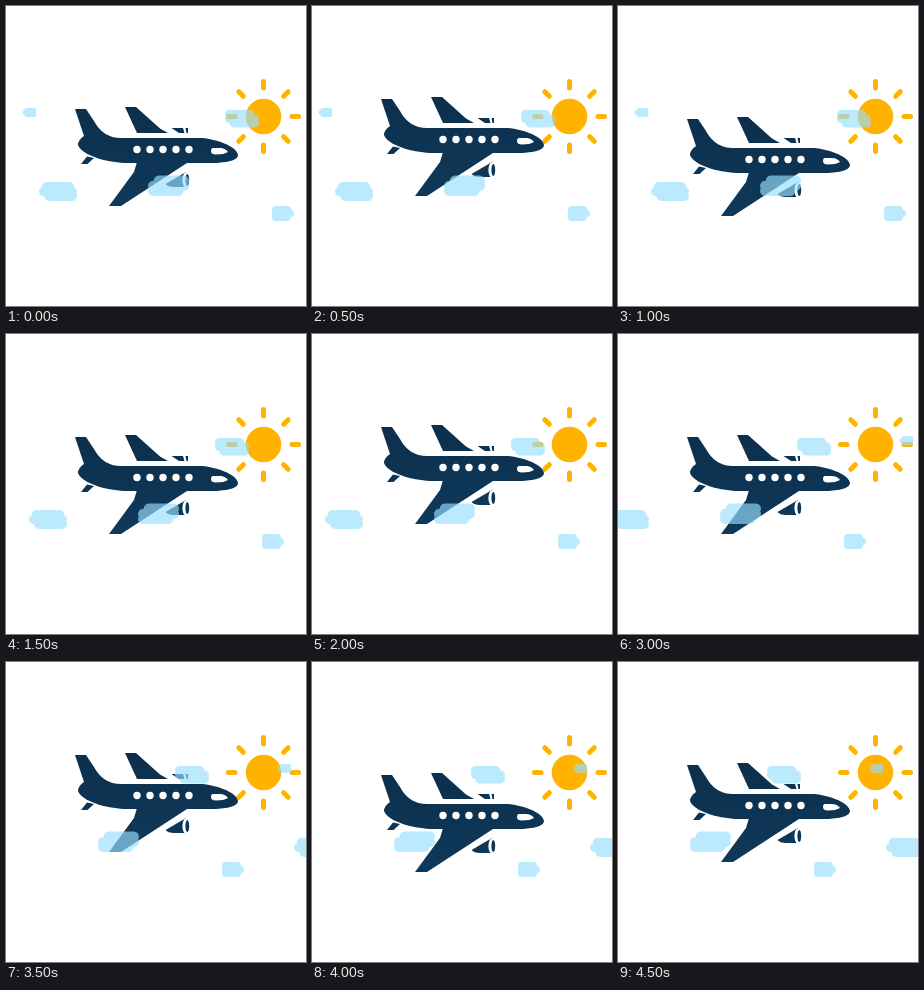
These frames come from a looping animation (300x300 px, 5 s). An HTML page with a canvas:

```html
<!DOCTYPE html>
<html lang="en">
<head>
<meta charset="utf-8">
<title>Plane and clouds</title>
<style>
  html, body { margin: 0; width: 100%; height: 100%; overflow: hidden; background: #fff; }
  canvas { display: block; width: 300px; height: 300px; }
</style>
</head>
<body>
<canvas id="stage" width="300" height="300"></canvas>
<script>
const ctx = document.getElementById('stage').getContext('2d');
const STEP = 500, STEPS = 10, SPAN = 305;
const AMBER = '#ffb300', SKY = 'rgba(152, 222, 252, 0.66)';

const navy = ctx.createLinearGradient(0, 100, 0, 200);
navy.addColorStop(0, '#0c2f4c');
navy.addColorStop(1, '#0f395a');

const plane = new Path2D([
  'M69 103 H80 L88 115 Q97 132 115 132 H193 C208 132 231 140 232 149',  // fuselage
  'C232 155 218 157 206 157 H118 C100 156 76 149.5 72 139 Q72 134 78 130 Z',
  'M81 150.5 L88 152 L81.5 158 H75 Z',                                  // stabilizer
  'M119 101 H130 L154 122.5 L162 127 H131 Z',                           // far wing
  'M165.5 122 H177 L178.5 127 H173 Z M179.5 122 H182 V127 H180.5 Z',    // far engine
  'M131 156 H183 L181 157 L115 200 H103 L128 166 Z',                    // near wing
  'M159.5 178 L180 166 V181 H168 Q162 181 159.5 178 Z'                  // near engine
].join(' '));
const cockpit = new Path2D(
  'M207 142 H214 Q219 142 222 146 Q218 148.5 210 148.5 Q205 148.5 205 145 Q205 142 207 142 Z');

// top and bottom: how far the outer rows slide, 0 = left, 1 = right.
// wrap: the step at which the cloud re-enters on the right.
const clouds = [
  { x: 219, y: 104, w: 34, h: 17.5, top: 0, bottom: 1 },
  { x: 33, y: 176, w: 38, h: 19, top: 0.5, bottom: 1, wrap: 7 },
  { x: 142, y: 169.5, w: 41, h: 20.5, top: 1, bottom: 0 },
  { x: 266, y: 200, w: 22, h: 15, top: 0, bottom: 0 },
  { x: 16.5, y: 102, w: 14, h: 9, top: 1, bottom: 1, wrap: 3 }
];

function ellipse(x, y, rx, ry, color) {
  ctx.fillStyle = color;
  ctx.beginPath();
  ctx.ellipse(x, y, rx, ry, 0, 0, Math.PI * 2);
  ctx.fill();
}

function drawSun() {
  ctx.save();
  ctx.translate(257.5, 110.5);
  ellipse(0, 0, 17.8, 17.8, AMBER);
  ctx.strokeStyle = AMBER;
  ctx.lineWidth = 5;
  ctx.lineCap = 'round';
  for (let i = 0; i < 8; i++) {
    ctx.beginPath();
    ctx.moveTo(28.5, 0);
    ctx.lineTo(35, 0);
    ctx.stroke();
    ctx.rotate(Math.PI / 4);
  }
  ctx.restore();
}

function drawPlane(dy) {
  ctx.save();
  ctx.translate(0, dy);
  ctx.fillStyle = navy;
  ctx.fill(plane);
  ellipse(179.8, 174, 3.4, 7.5, '#fff');
  ellipse(181.3, 174, 1.9, 6, navy);
  for (let i = 0; i < 5; i++) ellipse(131 + i * 13, 143.5, 3.7, 3.7, '#fff');
  ctx.fillStyle = '#fff';
  ctx.fill(cockpit);
  ctx.restore();
}

// Three overlapping rounded rows; the middle one has the full width.
function drawCloud({ x, y, w, h, top, bottom, wrap = STEPS }, step, drift) {
  const left = x - drift + (step >= wrap ? SPAN : 0);
  const inset = w * 0.14;
  const row = (i, dx, width) => ctx.roundRect(left + dx, y + i * h / 4, width, h / 2, h / 4);
  ctx.fillStyle = SKY;
  ctx.beginPath();
  row(0, inset * top, w - inset);
  row(1, 0, w);
  row(2, inset * bottom, w - inset);
  ctx.fill();
}

function draw(now) {
  const step = Math.floor(now / STEP) % STEPS;
  const bob = 10 * ((2 * step + 1) % 3 - 1);       // level, up, down
  const drift = 10 * (step < 2 ? step : step - 2); // the clouds restart at step 2
  ctx.fillStyle = '#fff';
  ctx.fillRect(0, 0, 300, 300);
  drawSun();
  drawPlane(bob);
  for (const cloud of clouds) drawCloud(cloud, step, drift);
}

function tick() {
  draw(performance.now());
  requestAnimationFrame(tick);
}
tick();
</script>
</body>
</html>
```
